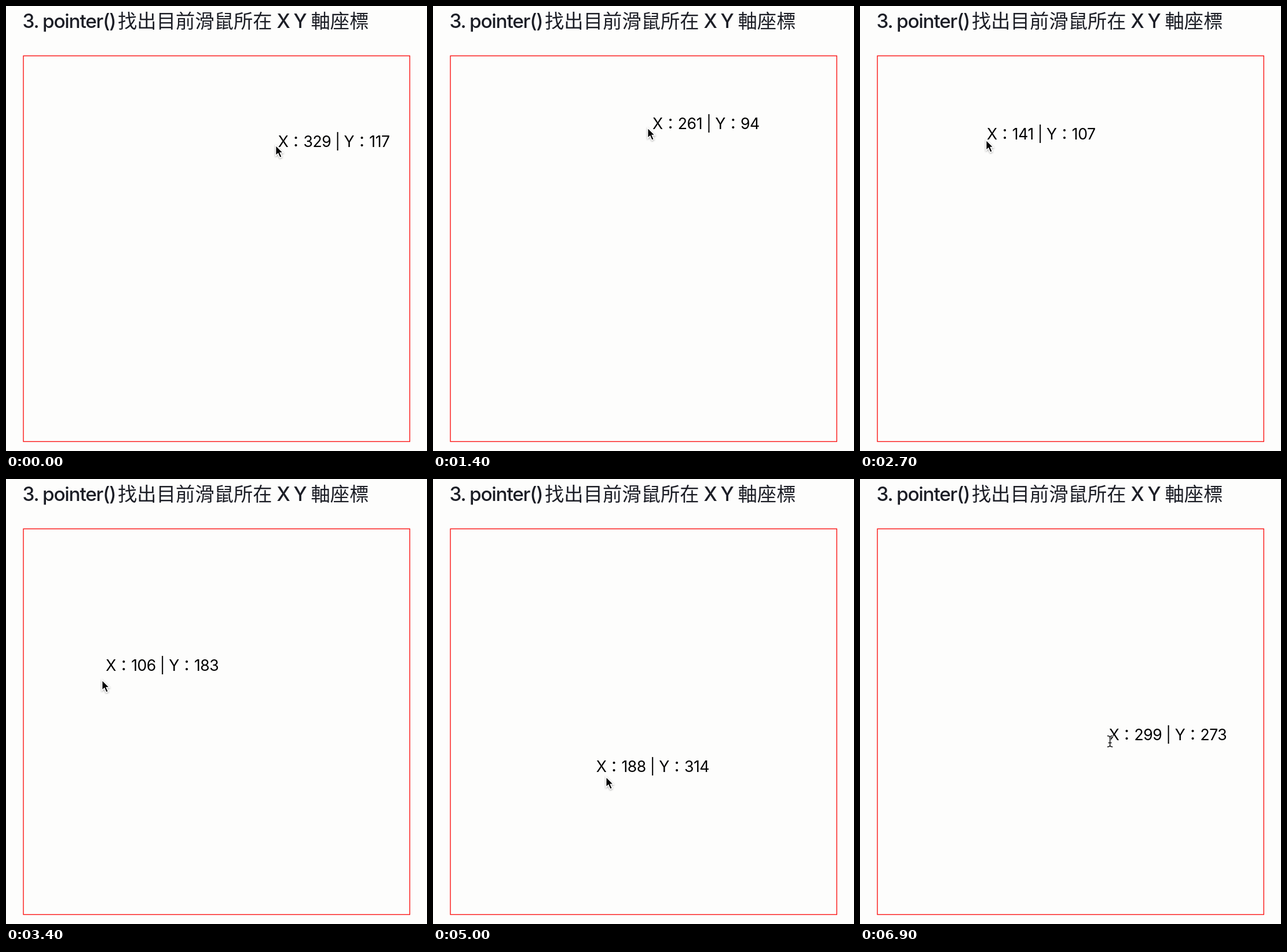
Animation of 727x770 px, one loop 7000 ms. Source, as an HTML page:

```html
<!DOCTYPE html>
<html lang="zh-Hant">
<head>
<meta charset="utf-8">
<title>pointer()</title>
<style>
  html, body { margin: 0; width: 100%; height: 100%; overflow: hidden; background: #fdfdfc; }
  svg { display: block; width: 727px; height: 770px; }
  text { font-family: Inter, "Noto Sans CJK TC", "Noto Sans CJK", sans-serif; white-space: pre; }
  .title { font-size: 33.33px; font-weight: 500; fill: #1c1e26; }
  .latin { letter-spacing: -1.2px; }
  #label { font-size: 26.67px; letter-spacing: -.5px; }
  .shadow { filter: drop-shadow(0 1.5px 1.5px rgba(0, 0, 0, .35)); }
</style>
</head>
<body>
<svg viewBox="0 0 727 770">
  <text class="title" y="38"><tspan class="latin" x="28.5">3.</tspan><tspan class="latin" x="63">pointer()</tspan><tspan x="193">找出目前滑鼠所在</tspan><tspan x="467.5">X</tspan><tspan x="496.5">Y</tspan><tspan x="526.5">軸座標</tspan></text>
  <rect x="30" y="86.3" width="667.3" height="667.3" fill="none" stroke="#fb1414" stroke-width="1.4"/>
  <text id="label"></text>
  <g id="arrow" class="shadow">
    <path d="M0 0V18.2L4.1 14.4L7.2 21.6L10.8 20.1L7.7 13H13Z" stroke="#fff" stroke-width="1.6"/>
  </g>
  <g id="beam" fill="none" stroke-linecap="round">
    <path id="beamLine" d="M-4.2 -9.5Q0 -9.5 0 -6.5Q0 -9.5 4.2 -9.5M0 -6.5V6.5M-4.2 9.5Q0 9.5 0 6.5Q0 9.5 4.2 9.5M-2.4 2.5H2.4" stroke="#fff" stroke-width="3"/>
    <use href="#beamLine"/>
    <path d="M-4.2 -9.5Q0 -9.5 0 -6.5Q0 -9.5 4.2 -9.5M0 -6.5V6.5M-4.2 9.5Q0 9.5 0 6.5Q0 9.5 4.2 9.5M-2.4 2.5H2.4" stroke="#111" stroke-width="1.5"/>
  </g>
</svg>
<script>
const LOOP = 7000, STEP = 100, SCALE = 4 / 3;

// time, x, y, velocity x, velocity y (units per step)
const path = [
  [0, 329, 117, -4, -3],
  [900, 284, 104, .5, -1],
  [2000, 206, 78, -8, -2],
  [2700, 141, 107, -1.3, 1],
  [4100, 80, 258, 1.5, 1],
  [5800, 288, 358, 3.7, 0],
  [6400, 296, 290, 1, -6],
  [6900, 299, 273, 2, 2]
];

const [label, arrow, beam] = ['label', 'arrow', 'beam'].map(id => document.getElementById(id));

// Cubic Hermite value and slope along one axis
function curve(a, b, va, vb, u, steps) {
  const c = 3 * (b - a) - (2 * va + vb) * steps;
  const d = 2 * (a - b) + (va + vb) * steps;
  return {
    pos: a + u * (va * steps + u * (c + u * d)),
    vel: va + u * (2 * c + 3 * u * d) / steps
  };
}

function sample(t) {
  let i = 0;
  while (i < path.length - 2 && t >= path[i + 1][0]) i++;
  const [t0, x0, y0, vx0, vy0] = path[i];
  const [t1, x1, y1, vx1, vy1] = path[i + 1];
  const u = (t - t0) / (t1 - t0), steps = (t1 - t0) / STEP;
  return [curve(x0, x1, vx0, vx1, u, steps), curve(y0, y1, vy0, vy1, u, steps)];
}

function place(el, x, y, shown) {
  el.setAttribute('transform', `translate(${x} ${y})`);
  el.setAttribute('visibility', shown ? 'visible' : 'hidden');
}

function draw(now) {
  const t = Math.floor(now % LOOP / STEP) * STEP;
  const [px, py] = sample(t);
  const x = Math.round(px.pos), y = Math.round(py.pos);
  const left = 31 + x * SCALE, base = 88 + y * SCALE;
  label.textContent = `X：${x} | Y：${y}`;
  place(label, left, base, true);

  // The mouse runs ahead of the label; over its text it becomes a beam
  const overText = px.vel > -.5 && py.vel < 7;
  place(arrow, left + px.vel, base + py.vel, !overText);
  place(beam, left + px.vel, base + py.vel, overText);
}

function tick() {
  draw(performance.now());
  requestAnimationFrame(tick);
}
tick();
</script>
</body>
</html>
```
